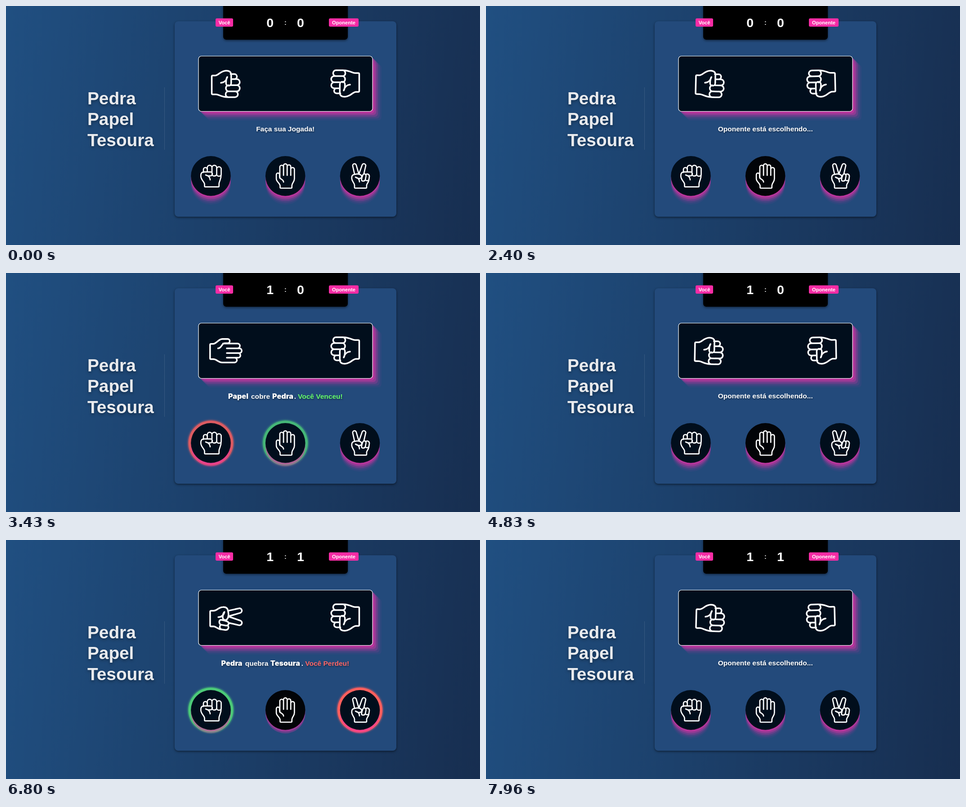
Write an HTML page that moves like this. It is 1054x532 px and loops after 8 s.

```html
<!DOCTYPE html>
<html lang="pt-BR">
<head>
<meta charset="utf-8">
<title>Pedra Papel Tesoura</title>
<style>
html, body { margin: 0; width: 100%; height: 100%; overflow: hidden; }
svg { display: block; width: 100vw; height: 100vh; background: linear-gradient(100deg, #204f81, #172e50); }
text { font-family: "Liberation Sans", Arial, sans-serif; font-weight: 700; fill: #fff; }
.mid { text-anchor: middle; }
.title { font-size: 38.75px; fill: #e9ebee; filter: drop-shadow(0 3px 3px rgba(0,0,0,.35)); }
.tag { font-size: 11.1px; }
.score { font-size: 28.5px; }
.status { font-size: 15.5px; filter: drop-shadow(1px 2px 1.5px rgba(0,0,0,.4)); }
.heavy { font-family: Inter, "Open Sans", sans-serif; font-weight: 900; font-size: 16.2px; }
.icon { fill: none; stroke: #fff; stroke-width: 2.7; stroke-linecap: round; stroke-linejoin: round; }
.card { filter: drop-shadow(0 2px 2.5px rgba(0,0,0,.5)); }
.glow { filter: blur(2.2px); }
</style>
</head>
<body>
<svg id="stage" viewBox="0 0 1054 532" preserveAspectRatio="none"></svg>
<script>
const LOOP = 8000, NAVY = '#010e1c', DARK = '#020408', PINK = '#f02eaa';
const RED = '#ff5f5d', GREEN = '#4cca78';
const stage = document.getElementById('stage');

const ICONS = {
  rock: 'M-16.5-8V-14.5a4.3 4.3 0 0 1 8.6 0V-9' +
    'M-7.9-14.5V-18.5a5.2 5.2 0 0 1 10.4 0V-9' +
    'M2.5-18.5a5.2 5.2 0 0 1 10.5 0V-4.5a5.2 4.5 0 0 1-10.5 0' +
    'M13-15.5a5 5 0 0 1 10 0V-4a5 4.5 0 0 1-10 0' +
    'M-16.5-9H-1a4.4 4.4 0 0 1 0 8.8C-4-.2-9-.6-11.5-2.3C-6-1-2 3-1.5 8.5' +
    'M-16.5-9C-20-8.5-22.3-5.5-22.3-.5C-22.3 9-14 13-14 18.5V22.5q0 1.7 1.7 1.7H16.5q1.7 0 1.7-1.7V17C18.2 12 23 8 23-4',
  paper: 'M-12.3 5V-19.8a4.1 4.1 0 0 1 8.2 0V-1.5' +
    'M-4.1-19.8V-23a4.05 4.05 0 0 1 8.1 0V-1.5' +
    'M4-20.8a4 4 0 0 1 8 0V-1.5' +
    'M12-14.8a4 4 0 0 1 8.1 0V6C20.1 14 14.5 15 14.5 21.5V25.4q0 1.7-1.7 1.7H-10q-1.7 0-1.7-1.7V22' +
    'C-11.7 16-20.1 13-20.1 6V-3a3.6 3.6 0 0 1 7.2 0V2C-12.5 8-4.5 6.5-4 13.5' +
    'M-4.1-20V-1.5M4-20V-1.5M12-15V-1.5',
  scissors: 'M-11.8-3.5L-16-22.2a4 4 0 0 1 7.8-2L-2.3-4' +
    'M-2.3-4L4.8-24.2a4.1 4.1 0 0 1 8 2L8.8-5' +
    'M3.5 9C4 5 5 1 6.3-2C8-6 14-5.5 13.5 0L12 8C11 12 5 12.5 3.5 9' +
    'M13.2-3C16-6 21.3-4 21 1L20 7.5C19 11 15 11.5 12.5 9' +
    'M-12-3.5C-6-5 0-4.5 3-1.5C5.5 2 3 5.5-1 5.5C-5 5.5-8 4.5-10 2.5C-4 4-1 7.5-1 13' +
    'M-12-3.5C-16.5-3-18.6 0-18.3 5C-18 13-12 15-12 21V25.3q0 1.7 1.7 1.7H13.2q1.7 0 1.7-1.7V21C14.9 17 20 14 20 7.5'
};

const icon = kind => `<path class="icon" d="${ICONS[kind]}"/>`;
const label = (x, y, cls, s, id = '') => `<text x="${x}" y="${y}" class="${cls}" id="${id}">${s}</text>`;
const rect = (x, y, w, h, r, extra) => `<rect x="${x}" y="${y}" width="${w}" height="${h}" rx="${r}" ${extra}/>`;

// Stacked hard shadows, faintest and farthest first.
const ALPHA = [.4, .3, .2, .1, .05], STEP = 3.875;
const stack = draw => ALPHA.map((a, i) => draw((i + 1) * STEP, a, i)).reverse().join('');

function button(kind, x) {
  return `<g id="${kind}" transform="translate(${x} 378.4)">
    <g class="ring" opacity="0"><circle class="glow" r="50.5"/><circle r="49.7"/></g>
    ${stack((d, a, i) => `<circle class="${i > 1 ? 'far' : ''}" cy="${d}" r="44.3" fill="${PINK}" fill-opacity="${a}"/>`)}
    <circle class="face" r="44.3" fill="${NAVY}"/>${icon(kind)}</g>`;
}

stage.innerHTML =
  ['Pedra', 'Papel', 'Tesoura'].map((s, i) => label(181, 218.8 + i * 46.5, 'title', s)).join('') +
  rect(352, 181, 1, 139, 0, 'fill="#fff" fill-opacity=".12"') +
  rect(375, 34, 493, 435, 8, 'fill="#234a7b" class="card"') +
  rect(483, -10, 277, 85, 7, 'fill="#000" class="card"') +
  rect(466, 27.5, 39, 18.5, 3, 'fill="#f72ca5"') +
  rect(718, 27.5, 66, 18.5, 3, 'fill="#f72ca5"') +
  label(485.5, 40.6, 'tag mid', 'Você') + label(751, 40.6, 'tag mid', 'Oponente') +
  label(587.3, 46.7, 'score mid', '0', 'mine') + label(655, 46.7, 'score mid', '0', 'theirs') +
  `<text x="621.3" y="41.8" class="mid" font-size="15.5" style="fill:#ddd">:</text>` +
  stack((d, a) => rect(427.5 + d, 111 + d, 388, 124, 7, `fill="${PINK}" fill-opacity="${a}"`)) +
  rect(428, 111.5, 387, 123, 6.5, `fill="${NAVY}" stroke="#fff" stroke-width="1.2"`) +
  '<g id="left"></g><g id="right"></g><g id="status"></g>' +
  button('rock', 455.5) + button('paper', 621.2) + button('scissors', 787);

const $ = id => document.getElementById(id);
const message = s => label(621.2, 279.3, 'status mid', s);
const parts = list => '<text y="280" class="status">' + list.map(([x, s, cls = '', fill = '#fff']) =>
  `<tspan x="${x}" class="${cls}" style="fill:${fill}">${s}</tspan>`).join('') + '</text>';

const IDLE = message('Faça sua Jogada!'), WAIT = message('Oponente está escolhendo...');
const WIN = parts([[494, 'Papel', 'heavy'], [545, 'cobre'], [592, 'Pedra', 'heavy'], [640.8, '.'],
  [649, 'Você Venceu!', '', '#66ff6c']]);
const LOSE = parts([[478.5, 'Pedra', 'heavy'], [531.8, 'quebra'], [587.8, 'Tesoura', 'heavy'], [656.7, '.'],
  [665.3, 'Você Perdeu!', '', '#ff6666']]);

const ROUNDS = [
  { press: 2060, shake: 2148, end: 3355, pick: 'paper', text: WIN, rings: { rock: RED, paper: GREEN } },
  { press: 4440, shake: 4547, end: 5775, pick: 'scissors', text: LOSE, rings: { rock: GREEN, scissors: RED } },
  { press: 6800, shake: 6960, end: 9000, pick: 'paper', text: WIN, rings: {} }
];
const HOVERS = [['paper', 1380, 2740], ['scissors', 4090, 4680], ['paper', 4740, 5120], ['paper', 6470, 7480]];
const HOLD = 90, FADE = 90, BEAT = 410, REACH = 10.3;

const shown = {};
function put(id, html) {
  if (shown[id] !== html) $(id).innerHTML = shown[id] = html;
}

function hand(id, x, side, kind, shift) {
  put(id, icon(kind));
  $(id).setAttribute('transform',
    `translate(${x + side * shift} 173) rotate(${side * (90 + shift * .15)}) scale(1.3)`);
}

function render(t) {
  let text = IDLE, pick = 'rock', shift = 0, rings = {}, glow = 0, pressed = '';
  for (const r of ROUNDS) {
    if (t >= r.press && t < r.press + HOLD) pressed = r.pick;
    if (t < r.press + HOLD) continue;
    const done = t >= r.end;
    text = done ? r.text : WAIT;
    pick = done ? r.pick : 'rock';
    rings = done ? r.rings : {};
    glow = Math.min(1, (t - r.end) / FADE);
    shift = done || t < r.shake ? 0 : REACH * (1 - Math.cos((t - r.shake) / BEAT * 2 * Math.PI)) / 2;
  }
  put('status', text);
  put('mine', t >= ROUNDS[0].end ? '1' : '0');
  put('theirs', t >= ROUNDS[1].end ? '1' : '0');
  hand('left', 489, 1, pick, shift);
  hand('right', 754, -1, 'rock', shift);

  for (const kind in ICONS) {
    const g = $(kind), ring = g.querySelector('.ring'), color = rings[kind];
    const hover = HOVERS.some(([k, a, b]) => k === kind && t >= a && t < b);
    g.querySelector('.face').setAttribute('fill', hover ? DARK : NAVY);
    ring.setAttribute('opacity', color ? glow : 0);
    ring.setAttribute('fill', color || 'none');
    const far = pressed === kind ? 0 : color ? 1 - glow : 1;
    g.querySelectorAll('.far').forEach(c => c.setAttribute('opacity', far));
  }
}

const start = performance.now();
function tick() {
  render((performance.now() - start) % LOOP);
  requestAnimationFrame(tick);
}
tick();
</script>
</body>
</html>
```
